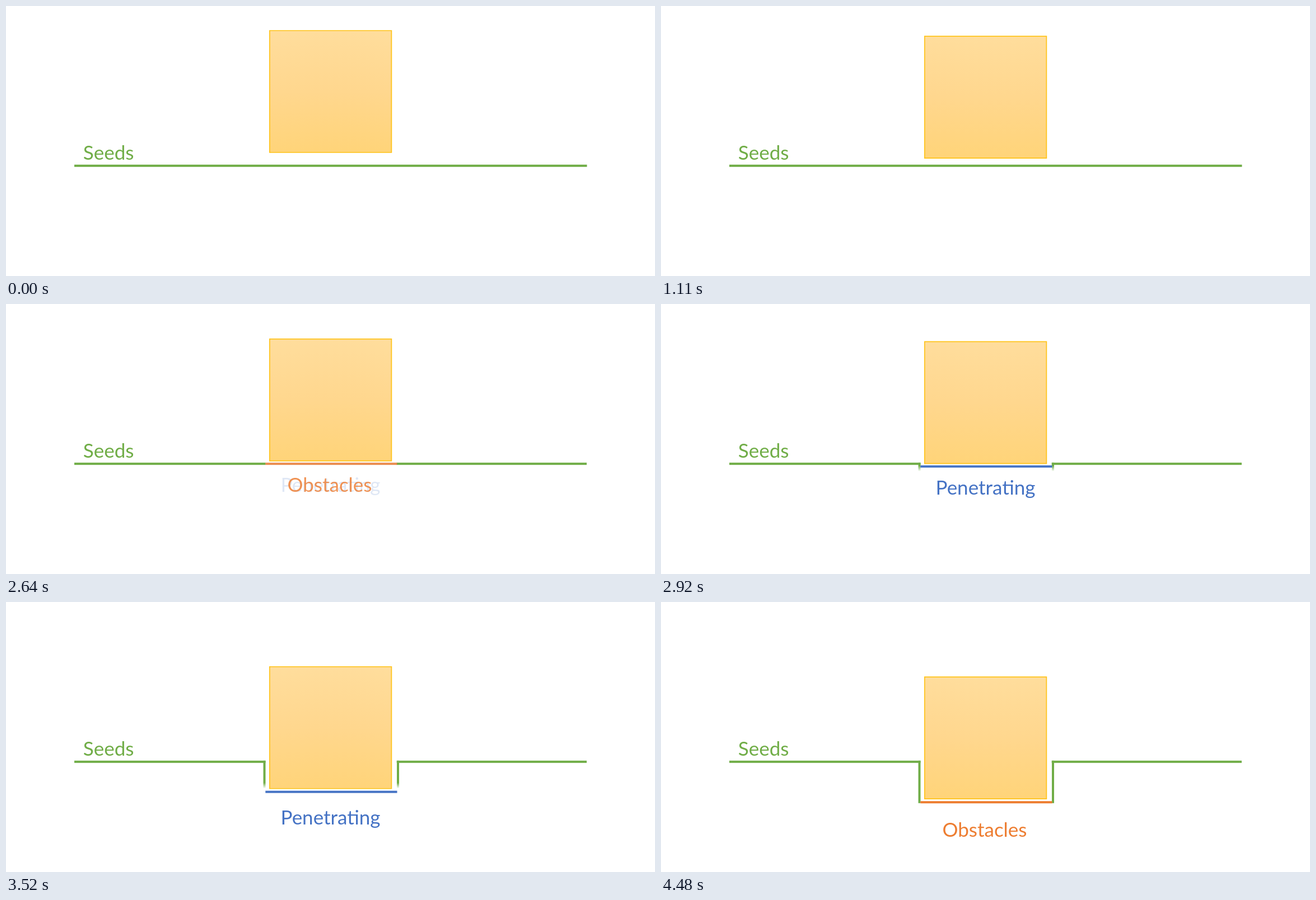
Recreate the animation shown at these times as an HTML page with a canvas. Size 1159 px wide and 483 px high, loop 4980 ms.

```html
<!DOCTYPE html>
<html lang="en">
<head>
<meta charset="utf-8">
<title>Seeds and obstacles</title>
<style>
html, body { margin: 0; width: 100%; height: 100%; overflow: hidden; background: #fff; }
canvas { display: block; }
</style>
</head>
<body>
<canvas id="stage" width="1159" height="483"></canvas>
<script>
const ctx = document.getElementById('stage').getContext('2d');
const GREEN = '#70ad47', ORANGE = '#ed7d31', BLUE = '#4472c4';
const LOOP = 4980, STEP = 40;

const clamp = (v, lo, hi) => Math.min(hi, Math.max(lo, v));
const ramp = (v, from, to) => clamp((v - from) / (to - from), 0, 1);
const steps = (t, start, max) => clamp(Math.floor((t - start) / STEP), 0, max);

function ease(u) {
  return u < 0.5 ? 0.5 * (2 * u) ** 2.4 : 1 - 0.5 * (2 - 2 * u) ** 2.4;
}

function bar(x1, y1, x2, y2, fill) {
  ctx.fillStyle = fill;
  ctx.fillRect(x1, y1, x2 - x1, y2 - y1);
}

function label(text, x, y, color, align) {
  ctx.fillStyle = color;
  ctx.textAlign = align;
  ctx.fillText(text, x, y);
}

function box(y) {
  const fill = ctx.createLinearGradient(0, y, 0, y + 218);
  fill.addColorStop(0, '#ffdd9c');
  fill.addColorStop(0.5, '#ffd78e');
  fill.addColorStop(1, '#ffd479');
  ctx.fillStyle = fill;
  ctx.strokeStyle = '#ffc31a';
  ctx.lineWidth = 1.7;
  ctx.beginPath();
  ctx.rect(470.8, y, 217.6, 218);
  ctx.fill();
  ctx.stroke();
}

// The coloured line below the box and its caption
function floor(text, x, color, alpha, sink) {
  if (!alpha) return;
  ctx.globalAlpha = alpha;
  bar(463.3, 283.8 + 72.4 * sink, 698.5, 287.8 + 72.4 * sink, color);
  label(text, x, 335.5 + 84 * sink, color, 'center');
  ctx.globalAlpha = 1;
}

// Side walls, wiped in from the top with a soft edge
function walls(tip) {
  const fill = ctx.createLinearGradient(0, tip - 10, 0, tip);
  fill.addColorStop(0, GREEN);
  fill.addColorStop(1, GREEN + '00');
  bar(459.5, 283.8, 463.5, 359.8, fill);
  bar(698, 283.8, 702, 359.8, fill);
}

function draw(t) {
  const fall = steps(t, 590, 25);
  const push = steps(t, 2600, 47);
  const sink = ease(ramp(push, 0, 37));

  bar(0, 0, 1159, 483, '#fff');
  ctx.font = '35px Lato, Carlito, sans-serif';
  label('Seeds', 137.8, 275, GREEN, 'left');

  if (fall < 25) {
    bar(122, 283.8, 1037.5, 287.8, GREEN);
  } else {
    bar(122, 283.8, 463.5, 287.8, GREEN);
    bar(697.7, 283.8, 1037, 287.8, GREEN);
  }
  if (push) walls(281 + 2.28 * push);

  const blue = ramp(push, 0, 6) * (1 - ramp(push, 37, 47));
  const orange = push < 37 ? ramp(fall, 14, 25) * (1 - ramp(push, 0, 6)) : ramp(push, 37, 47);
  floor('Penetrating', 579.5, BLUE, blue, sink);
  floor('Obstacles', 578, ORANGE, orange, sink);
  box(44 + 18.5 * ease(fall / 25) + 71.6 * sink);
}

const start = performance.now();
function tick() {
  draw((performance.now() - start) % LOOP);
  requestAnimationFrame(tick);
}
tick();
</script>
</body>
</html>
```
